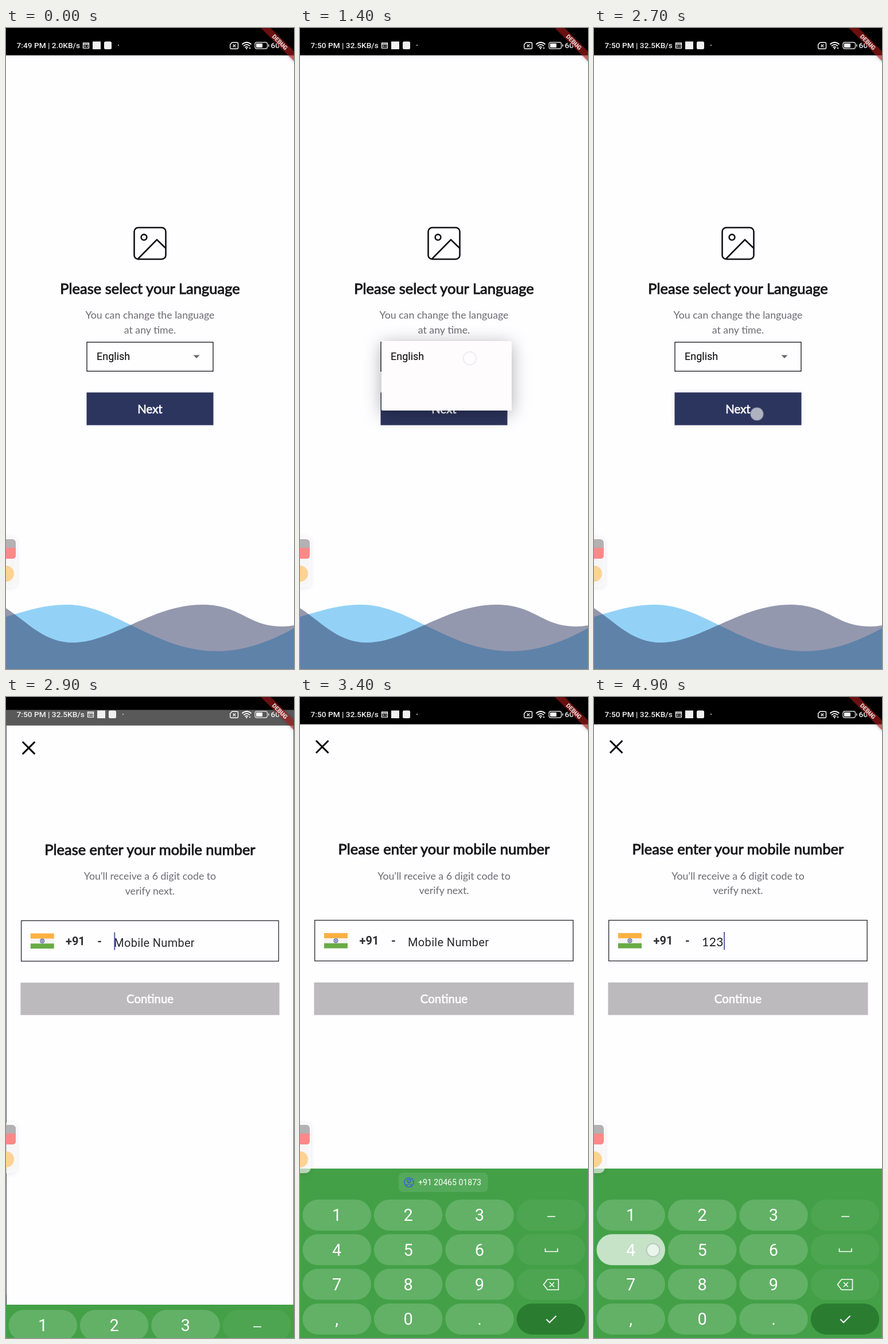
These frames come from a looping animation (502 px wide and 1116 px high, 5000 ms). An HTML page:

```html
<!DOCTYPE html>
<html lang="en">
<head>
<meta charset="utf-8">
<title>Sign-in flow</title>
<style>
html, body { margin: 0; width: 100%; height: 100%; overflow: hidden; background: #000; }
svg { display: block; width: 100vw; height: 100vh; }
text { font-family: Roboto, sans-serif; white-space: pre; }
.lato { font-family: Lato, sans-serif; text-anchor: middle; }
.head { font-size: 25.55px; fill: #18181b; stroke: #18181b; stroke-width: .9; }
.sub { font-size: 17.75px; fill: #6d6b70; }
.btn { font-size: 20.4px; fill: #fff; stroke: #fff; stroke-width: .7; }
.bar { font-size: 13.7px; font-weight: 500; fill: #f2f2f2; }
.key { font-size: 29px; fill: #fff; text-anchor: middle; }
.line { fill: none; stroke: #fff; stroke-width: 1.6; }
#menu rect { filter: drop-shadow(0 5px 15px rgba(0,0,0,.33)); }
#panel { filter: drop-shadow(0 1px 4px rgba(0,0,0,.14)); }
#banner rect { filter: drop-shadow(0 0 3px rgba(0,0,0,.4)); }
</style>
</head>
<body>
<svg id="stage" viewBox="0 0 502 1116" preserveAspectRatio="none" xmlns="http://www.w3.org/2000/svg"></svg>
<script>
const LOOP = 5000, STEP = 100, MID = [251, 570], TOP = 47.6;
const PAGE = '#fefdff', NAVY = '#2c355e';

const rect = (x, y, w, h, fill, extra = '') =>
  `<rect x="${x}" y="${y}" width="${w}" height="${h}" fill="${fill}" ${extra}/>`;
const text = (x, y, str, cls, extra = '') =>
  `<text x="${x}" y="${y}" class="${cls}" ${extra}>${str}</text>`;
const line = (d, extra = '') => `<path class="line" d="${d}" ${extra}/>`;

function waves() {
  const foot = 'V1116H0Z';
  return `<path fill="#93d2f6" d="M0 1025C38 1014 68 1004 107 1004C190 1004 260 1085 368 1085C420 1085 465 1065 502 1045${foot}"/>
    <path fill="${NAVY}" fill-opacity=".5" d="M0 1010C36 1033 66 1070 116 1070C185 1070 255 1004 342 1004C410 1004 420 1042 482 1042Q492 1042 502 1040${foot}"/>`;
}

function languagePage() {
  return rect(0, TOP, 502, 1069, PAGE) + waves() +
    `<g fill="none" stroke="#111114" stroke-width="2.6">
      <rect x="223.5" y="347.5" width="55" height="55" rx="7"/>
      <circle cx="240.5" cy="364.3" r="4.9"/>
      <path d="M230 402L263 368.5L278.5 383.5"/></g>` +
    text(251, 463, 'Please select your Language', 'lato head') +
    text(251, 506, 'You can change the language', 'lato sub') +
    text(251, 531.7, 'at any time.', 'lato sub') +
    rect(141, 547, 220, 50.5, PAGE, 'stroke="#111" stroke-width="1.3"') +
    text(158, 577.6, 'English', '', 'font-size="18"') +
    '<path d="M326.5 569.5H337.5L332 575Z" fill="#666"/>' +
    rect(140.5, 634.5, 221, 57, NAVY, 'id="next"') +
    text(251, 670.7, 'Next', 'lato btn') +
    `<g id="menu">${rect(142, 545, 227, 121, '#fffcfe', 'id="sheet" rx="2"')}
      ${text(158, 577.6, 'English', '', 'font-size="18"')}</g>`;
}

function numberPage() {
  return rect(0, TOP, 502, 1069, PAGE) +
    line('M28 76L49.5 97.5M49.5 76L28 97.5', 'style="stroke:#000;stroke-width:3"') +
    text(251, 273.5, 'Please enter your mobile number', 'lato head') +
    text(251, 317.5, 'You’ll receive a 6 digit code to', 'lato sub') +
    text(251, 343.3, 'verify next.', 'lato sub') +
    rect(25.7, 388.7, 450.4, 70.8, PAGE, 'stroke="#26282f" stroke-width="1.3"') +
    rect(42, 411, 41, 26.5, '#f4f4f4') + rect(42, 411, 41, 9, '#fdb142') + rect(42, 428.7, 41, 8.8, '#68ab45') +
    '<circle cx="62.5" cy="424.2" r="3.4" fill="#b9bbd8" stroke="#5b5fa0" stroke-width="1.1"/><circle cx="62.5" cy="424.2" r="1.1" fill="#5b5fa0"/>' +
    text(103.5, 431, '+91', '', 'font-size="20" font-weight="700" fill="#303033"') +
    text(159, 431, '-', '', 'font-size="20" font-weight="700" fill="#303033"') +
    text(188, 434, 'Mobile Number', '', 'id="hint" font-size="20" letter-spacing=".35" fill="#2b2b2f"') +
    text(188, 434, '', 'lato', 'id="typed" font-size="21" letter-spacing=".5" fill="#1c1b1f" style="text-anchor:start"') +
    rect(188, 409, 2, 31, '#5560a6', 'id="cursor"') +
    rect(24.5, 497, 453, 56.7, '#bcbabc') +
    text(251, 532.8, 'Continue', 'lato btn');
}

function keyboard() {
  const labels = ['123', '456', '789', ',0.'];
  let keys = '';
  labels.forEach((row, r) => {
    const y = 902 + r * 60.3;
    for (let c = 0; c < 4; c++) {
      const x = 4.5 + c * 124.4, label = row[c];
      const fill = label ? '#62b166' : r === 3 ? '#2a7d30' : '#4da551';
      keys += rect(x, y - 27, 119.5, 54, fill, `rx="27" id="key${label ? r * 3 + c + 1 : 'x' + r}"`);
      if (label) keys += text(x + 59.7, y + 10.4, label, 'key');
    }
  });
  keys += line('M431 904.5H445', 'stroke-width="2"') +
    line('M427.5 960V965.5H449V960') +
    line('M431.5 1014H450.5V1032H431.5L424.5 1023ZM435 1019L443 1027M443 1019L435 1027') +
    line('M429.5 1083.5L435 1089L446.5 1077.5', 'style="stroke-width:2.2"');
  const chip = rect(172, 828, 155.5, 34, '#55a95a', 'rx="8"') +
    `<g fill="none" stroke="#3a5fd6" stroke-width="1.6"><circle cx="190" cy="845" r="8"/>
      <circle cx="190" cy="842.5" r="2.6"/><path d="M184.5 850.5Q190 845.5 195.5 850.5"/></g>` +
    text(206, 850, '+91 20465 01873', '', 'font-size="14.1" fill="#fff"');
  return rect(0, 821, 502, 300, '#43a047', 'id="board"') + `<g id="keys">${keys}</g><g id="chip">${chip}</g>`;
}

function sideTools() {
  return `<g id="side">
    <path id="panel" fill="#fff" fill-opacity=".62" d="M-6 886H8Q19 886 19 897V962Q19 974 8 974H-6Z"/>
    ${rect(-17, 890, 34, 34, '#b3b1b3', 'rx="6"')}
    <path fill="#fb8987" d="M0 905H17V918Q17 924 11 924H0Z"/>
    <circle cx="0" cy="950" r="14" fill="#fdd293"/></g>`;
}

function statusBar() {
  return text(18.5, 35.3, '', 'bar', 'id="clock"') +
    `<g id="notes">
      <rect x="134.5" y="26" width="10" height="9" class="line" style="stroke-width:1.3"/>
      ${line('M134 28.3H145M136 31.5H139.5M141 31.5H143', 'style="stroke-width:1.5"')}
      ${rect(151, 23.5, 14, 13.5, '#f1f1f1')}${rect(171, 23.5, 13, 13.5, '#f1f1f1', 'rx="2.5"')}
      <circle cx="196" cy="30" r="1" fill="#ddd"/></g>` +
    line('M394 25.3H402.5Q404.5 25.3 404.5 27V34.5Q404.5 36.2 402.5 36.2H392.5Q390.7 36.2 390.7 34.5V29ZM395.7 28.7L400.3 33.3M400.3 28.7L395.7 33.3', 'style="stroke-width:1.4"') +
    line('M411.5 28.5Q419.5 21.5 427.5 28.5M414 31.3Q419.5 26.5 425 31.3M416.5 34Q419.5 31.4 422 34', 'style="stroke-width:1.7"') +
    '<circle cx="419.3" cy="35.8" r="1.3" fill="#fff"/><circle cx="425" cy="35" r="1.3" fill="#ddd"/>' +
    rect(434, 25, 21.5, 11, 'none', 'rx="3" stroke="#ddd" stroke-width="1.3"') +
    rect(436, 27, 11, 7, '#fff', 'rx="1"') + rect(457, 28.5, 1.6, 4, '#ddd') +
    text(461.5, 35.3, '60%', 'bar');
}

const banner = `<g id="banner" transform="translate(502 0) rotate(45)">
  ${rect(-62, 28.7, 124, 12.2, '#b71c1c', 'fill-opacity=".59"')}
  ${text(0, 38.5, 'DEBUG', '', 'font-size="10.4" font-weight="900" fill="#fff" fill-opacity=".8" text-anchor="middle"')}</g>`;

document.getElementById('stage').innerHTML =
  rect(0, 0, 502, 1116, '#000') +
  `<g id="first">${languagePage()}</g>` +
  rect(0, 0, 502, 1116, '#000', 'id="scrim"') +
  `<g id="second">${numberPage()}</g><g id="kb">${keyboard()}</g>` +
  sideTools() + statusBar() + banner +
  '<circle id="touch" r="11.3" fill="#fff" fill-opacity=".62" stroke="#777a90" stroke-opacity=".28" stroke-width="2"/>';

const el = {};
document.querySelectorAll('[id]').forEach(n => el[n.id] = n);
const set = (id, name, value) => el[id].setAttribute(name, value);
const show = (id, on) => set(id, 'visibility', on ? 'visible' : 'hidden');
const clamp = v => Math.min(1, Math.max(0, v));
const ramp = (t, a, b) => clamp((t - a) / (b - a));
const zoom = (id, s) =>
  set(id, 'transform', `translate(${MID[0] * (1 - s)} ${MID[1] * (1 - s)}) scale(${s})`);

// start, end, x, y; the mark fades during the last step
const taps = [
  [1200, 1500, 296, 575], [1800, 2100, 262, 574], [2500, 2900, 284, 672],
  [4100, 4300, 78, 902], [4300, 4600, 202, 899], [4600, 4800, 320, 902], [4800, 5100, 103, 963]
];
// key number, press, release
const presses = [[1, 4100, 4200], [2, 4300, 4400], [3, 4600, 4700], [4, 4900, 5000]];

function draw(t) {
  const late = t >= 600;
  el.clock.textContent = late ? '7:50 PM | 32.5KB/s' : '7:49 PM | 2.0KB/s';
  set('notes', 'transform', `translate(${late ? 8 : 0} 0)`);

  const open = ramp(t, 1200, 1400) * (1 - ramp(t, 2000, 2300));
  show('menu', open > 0);
  set('menu', 'opacity', open);
  set('sheet', 'height', 52 + 69 * ramp(t, 1300, 1400));
  el.next.style.filter = t >= 2500 && t < 2800 ? 'drop-shadow(0 0 5px rgba(0,0,0,.08))' : '';

  const onSecond = t >= 2800;
  const enter = 1 - Math.pow(1 - ramp(t, 2700, 3000), 3);
  zoom('first', 1 + .05 * enter);
  zoom('second', onSecond ? .892 + .108 * enter : 1);
  set('scrim', 'opacity', onSecond ? .67 * enter : 0);
  show('second', onSecond);
  show('scrim', onSecond && t < 3000);
  show('first', t < 3000);

  const boardUp = t >= 2900;
  const left = Math.pow(1 - ramp(t, 2900, 3400), 3);
  set('kb', 'display', boardUp ? 'inline' : 'none');
  set('board', 'y', 821 + 237 * left);
  set('keys', 'transform', `translate(0 ${192 * left})`);
  show('chip', t >= 3400 && t < 4200);
  set('side', 'transform', `translate(0 ${boardUp ? -145 : 0})`);

  const count = presses.filter(p => t >= p[2]).length;
  el.typed.textContent = '1234'.slice(0, count);
  set('hint', 'display', count ? 'none' : 'inline');
  set('cursor', 'x', 188 + 12.7 * count);
  set('cursor', 'display', boardUp && (t < 3400 || t >= 3800) ? 'inline' : 'none');
  for (const [n, a, b] of presses) set('key' + n, 'fill', t >= a && t < b ? '#c6e3c8' : '#62b166');

  const tap = taps.find(p => t >= p[0] && t < p[1]);
  show('touch', tap);
  if (tap) {
    set('touch', 'cx', tap[2]);
    set('touch', 'cy', tap[3]);
    set('touch', 'opacity', t < tap[1] - STEP ? 1 : .45);
  }
}

function tick(now) {
  draw(Math.floor(now % LOOP / STEP) * STEP);
  requestAnimationFrame(tick);
}
draw(0);
requestAnimationFrame(tick);
</script>
</body>
</html>
```
